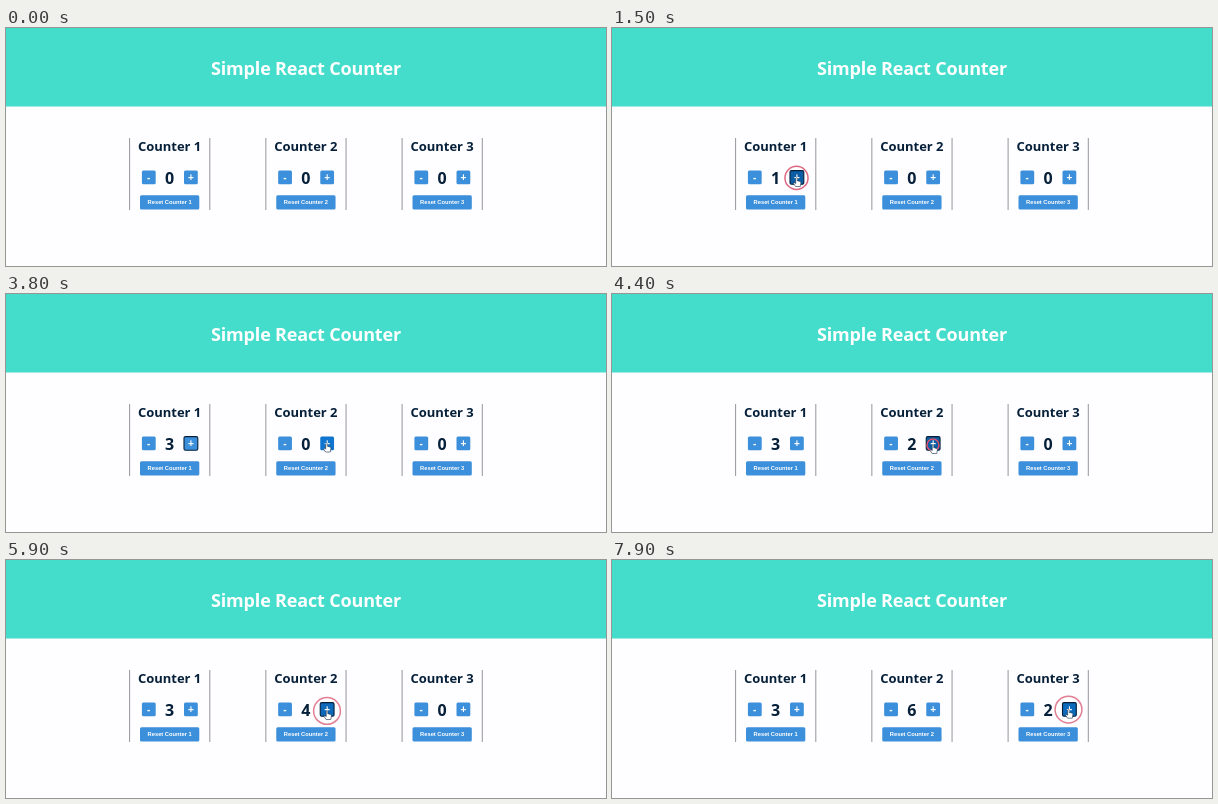
Animation, 600 px wide and 238 px high, one loop 8000 ms. Source, as an HTML page:

```html
<!DOCTYPE html>
<html lang="en">
<head>
<meta charset="utf-8">
<title>Simple React Counter</title>
<style>
  html, body { margin: 0; width: 100%; height: 100%; overflow: hidden; background: #fefdff; }
  svg { display: block; width: 100vw; height: 100vh; }
  text { text-anchor: middle; }
  .title, .head, .value { font-family: "Open Sans", "Noto Sans", sans-serif; font-weight: 700; fill: #06203a; }
  .title { font-size: 18px; letter-spacing: -0.17px; fill: #fff; }
  .head { font-size: 13px; letter-spacing: -0.04px; }
  .value { font-size: 16px; }
  .sign, .reset { font-family: "Liberation Sans", Arial, sans-serif; font-weight: 700; fill: #fff; }
  .sign { font-size: 10px; }
  .reset { font-size: 5.75px; }
</style>
</head>
<body>
<svg id="stage" viewBox="0 0 600 238">
  <rect width="600" height="238" fill="#fefdff"/>
  <rect width="600" height="78.5" fill="#44dccb"/>
  <text class="title" x="300" y="47">Simple React Counter</text>
</svg>
<script>
const LOOP = 8000, STEP = 100, PITCH = 136.25, LEFT = 123.6;
const BLUE = '#3c8fda', HOVER = '#0f75ce', FOCUS = '#0d69ba', PRESS = '#0b5da6', DARK = '#06203a';
const stage = document.getElementById('stage');

// Times of the plus clicks, per counter
const clicks = [
  [1400, 1900, 2400],
  [4200, 4400, 5500, 5700, 6000, 6500],
  [7500, 7700]
];
const presses = clicks.flatMap((times, i) => times.map(at => ({ at, i })));

// Pointer stops: time, x, y
const path = [
  [100, 228, 172], [900, 184.5, 149.5], [3100, 184.5, 149.5], [3700, 320.5, 149],
  [4100, 320.5, 149], [4200, 321, 150.5], [6800, 321, 150.5], [7300, 456.5, 149.2]
];

function add(tag, attrs, parent = stage, text = '') {
  const el = document.createElementNS('http://www.w3.org/2000/svg', tag);
  set(el, attrs);
  el.textContent = text;
  return parent.appendChild(el);
}

function set(el, attrs) {
  for (const key in attrs) el.setAttribute(key, attrs[key]);
}

function button(parent, x, y, w, h, cls, label, baseline) {
  const box = add('rect', { x, y, width: w, height: h, rx: 1.5, fill: BLUE, 'stroke-width': 1.1 }, parent);
  add('text', { class: cls, x: x + w / 2, y: baseline }, parent, label);
  return box;
}

const counters = clicks.map((times, i) => {
  const left = LEFT + i * PITCH;
  const g = add('g', { transform: `translate(${left} 0)` });
  for (const x of [0, 80.2]) add('path', { d: `M${x} 110V182`, stroke: '#7c7c80', 'stroke-width': 0.8 }, g);
  add('text', { class: 'head', x: 40, y: 123.4 }, g, `Counter ${i + 1}`);
  const minus = button(g, 12.3, 142.6, 13.8, 13.7, 'sign', '-', 152.6);
  const plus = button(g, 54.4, 142.6, 13.8, 13.7, 'sign', '+', 152.8);
  const reset = button(g, 10.4, 167.2, 59.3, 14.4, 'reset', `Reset Counter ${i + 1}`, 176.2);
  const value = add('text', { class: 'value', x: 40.1, y: 155.8 }, g, '0');
  return { left, minus, plus, reset, value, times };
});

const ring = add('circle', { fill: 'none', stroke: '#d8506c', 'stroke-width': 1.5 });
const pointer = { fill: '#fff', stroke: '#183048', 'stroke-width': 0.6, 'stroke-linejoin': 'round' };
const arrow = add('path', { ...pointer, d: 'M0 0V8L1.9 6.3L3.1 9L4.4 8.4L3.2 5.8H5.7Z' });
const hand = add('path', {
  ...pointer,
  d: 'M-.8 .6Q0 -.6 .8 .6V3.2L3.6 3.9Q4.6 4.2 4.4 5.4L3.8 9H-.9L-3 5.9Q-2.8 4.9-1.8 5.3L-.8 6Z'
});

const ease = p => p < 0.5 ? 2 * p * p : 1 - 2 * (1 - p) ** 2;

function place(t) {
  let k = 0;
  while (k < path.length - 1 && t >= path[k + 1][0]) k++;
  const [t0, x0, y0] = path[k];
  const [t1, x1, y1] = path[k + 1] || [t0 + 1, x0, y0];
  const p = ease(Math.min(1, Math.max(0, (t - t0) / (t1 - t0))));
  return [x0 + (x1 - x0) * p, y0 + (y1 - y0) * p];
}

function inside(box, x, y) {
  const [bx, by, w, h] = ['x', 'y', 'width', 'height'].map(a => +box.getAttribute(a));
  return x >= bx && x <= bx + w && y >= by && y <= by + h;
}

function draw(t) {
  const [x, y] = place(t);
  const shown = t >= path[0][0];
  const last = presses.filter(p => p.at <= t).pop();
  const age = last ? t - last.at : Infinity;
  let over = false;

  counters.forEach((c, i) => {
    c.value.textContent = c.times.filter(at => at <= t).length;
    for (const box of [c.minus, c.plus, c.reset]) {
      const hover = shown && inside(box, x - c.left, y);
      const focus = box === c.plus && last && last.i === i;
      over = over || hover;
      set(box, {
        fill: !hover ? BLUE : !focus ? HOVER : age < 200 ? PRESS : FOCUS,
        stroke: focus ? DARK : 'none'
      });
    }
  });

  const move = `translate(${x} ${y})`;
  set(arrow, { transform: move, visibility: shown && !over ? 'visible' : 'hidden' });
  set(hand, { transform: move, visibility: over ? 'visible' : 'hidden' });

  // Each click sends out a ring that widens and pales
  const p = Math.min(1, age / 300);
  set(ring, {
    cx: x, cy: y + 0.4,
    r: 6 + 7.4 * (1 - (1 - Math.min(1, p * 1.5)) ** 2),
    opacity: p < 1 ? 1 - 0.4 * p : 0
  });
}

function tick(now) {
  draw(Math.floor(now % LOOP / STEP) * STEP);
  requestAnimationFrame(tick);
}
draw(0);
requestAnimationFrame(tick);
</script>
</body>
</html>
```
